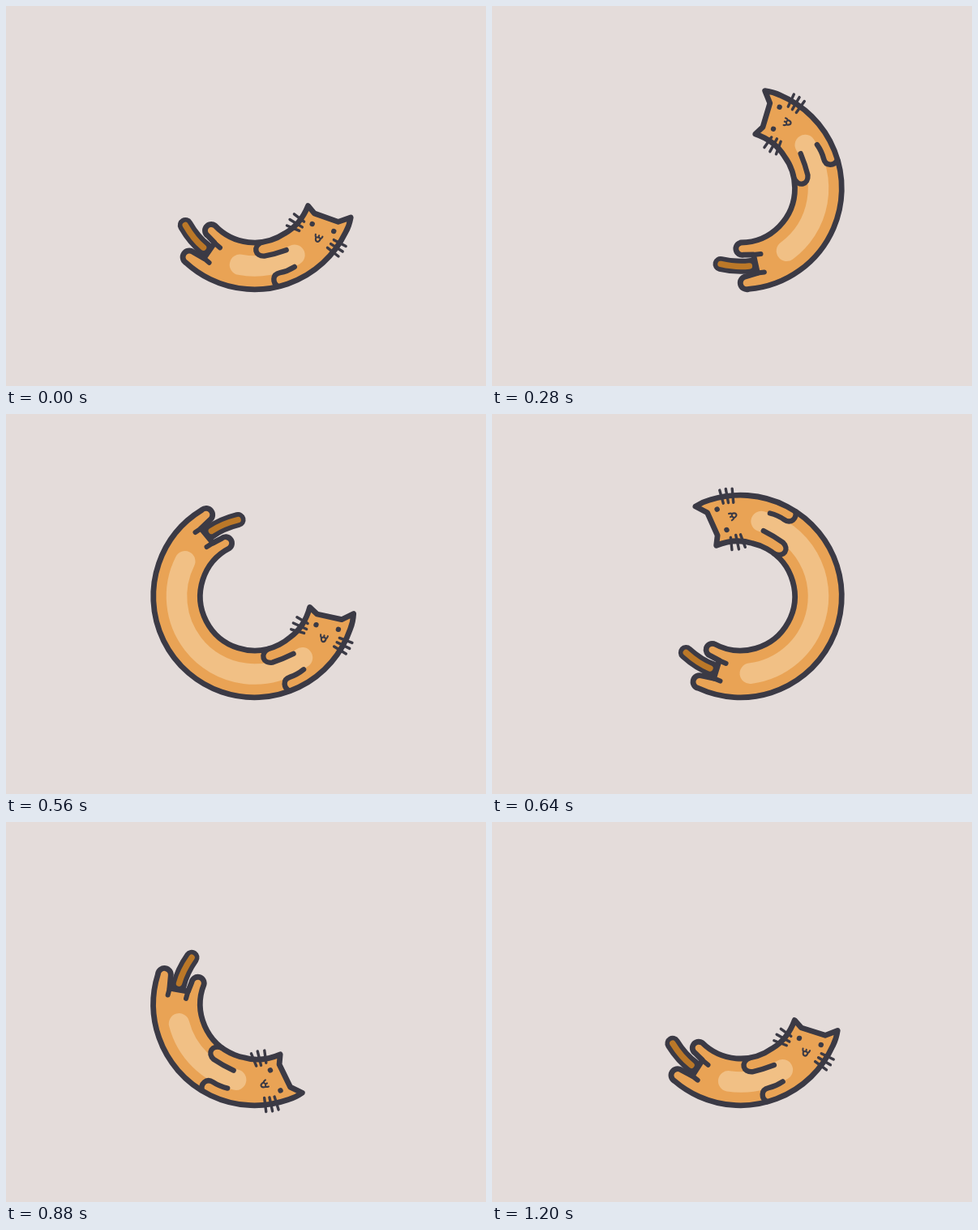
These frames come from a looping animation (592x469 px, 1.24 s). An HTML page with a canvas:

```html
<!DOCTYPE html>
<html lang="en">
<head>
<meta charset="utf-8">
<title>Cat chasing round a ring</title>
<style>
html, body { margin: 0; width: 100%; height: 100%; overflow: hidden; background: #e4dcda; }
canvas { display: block; }
</style>
</head>
<body>
<canvas id="stage" width="592" height="469"></canvas>
<script>
const ctx = document.getElementById('stage').getContext('2d');
const LOOP = 1240, STEP = 40;
const INNER = 67, OUTER = 124.8, BELLY = 96;
const DARK = '#3b3a45', FUR = '#e9a355', LIGHT = '#f1c085', TAIL = '#bb7828';
const rad = deg => deg * Math.PI / 180;

// Keys: time in ms, ring angle in degrees, speed in degrees per ms.
const headKeys = [[0, -30, .08], [280, 62.8, .55], [440, 189.3, 1.02], [560, 336.9, 1.42],
  [720, 571.3, .95], [880, 645.2, .27], [1200, 691.7, .03]];
const tailKeys = [[0, -124.8, .03], [280, -77.6, .42], [440, 27.2, .72], [560, 129.3, 1.1],
  [720, 384.8, 1.3], [880, 530.4, .5], [1200, 597.1, .02]];

// Cubic Hermite interpolation between keys.
function angleAt(keys, t) {
  let i = 0;
  while (i < keys.length - 2 && t >= keys[i + 1][0]) i++;
  const [t0, a, va] = keys[i], [t1, b, vb] = keys[i + 1];
  const d = t1 - t0, u = (t - t0) / d, w = 1 - u;
  return a * w * w * (1 + 2 * u) + b * u * u * (3 - 2 * u) + d * u * w * (va * w - vb * u);
}

// Origin at the ring centre; x points outwards at the given angle, -y points ahead.
function frame(deg) {
  ctx.setTransform(1, 0, 0, 1, 306.5, 225);
  ctx.rotate(-rad(deg));
}

function stroke(path, width, color = DARK) {
  ctx.lineWidth = width;
  ctx.strokeStyle = color;
  ctx.stroke(new Path2D(path));
}

function drawTail(angle) {
  frame(angle);
  stroke('M96 7Q95 25 86 44', 19);
  stroke('M96 10Q94.5 26 86 44', 7.5, TAIL);
}

function drawBody(head, tail) {
  ctx.beginPath();
  frame(head);
  ctx.moveTo(53, 41);
  ctx.quadraticCurveTo(68, 25, 69.5, -.5);
  ctx.lineTo(80, 6);
  ctx.lineTo(111, 6.5);
  ctx.lineTo(124, -3.5);
  ctx.quadraticCurveTo(125.5, 7, 123.8, 16);
  frame(0);
  ctx.arc(0, 0, OUTER, rad(7.4 - head), rad(7.9 - tail));
  frame(tail);
  ctx.arc(115.7, 17.5, 8, 0, Math.PI);
  ctx.lineTo(106.5, 2);
  ctx.lineTo(83.5, 2);
  ctx.lineTo(81, 14);
  ctx.arc(73.3, 14, 7.7, 0, Math.PI);
  frame(0);
  ctx.arc(0, 0, INNER, rad(12 - tail), rad(37.7 - head), true);
  ctx.closePath();
  ctx.fillStyle = FUR;
  ctx.fill();
  ctx.lineWidth = 6.8;
  ctx.strokeStyle = DARK;
  ctx.stroke();

  ctx.beginPath();
  ctx.arc(0, 0, BELLY, rad(40.5 - head), rad(-24 - tail));
  ctx.lineWidth = 25.5;
  ctx.strokeStyle = LIGHT;
  ctx.stroke();

  frame(tail);
  stroke('M106.5 2L107.3-6.5M83.5 2L84.5-7', 6);
}

function drawHead(angle) {
  frame(angle);
  stroke('M61.3 59.8Q49.3 69.2 38 75.5C27.5 79.5 20 69 30 60', 6.4);
  stroke('M77.5 76.3Q71 84.3 63 88.8C54 94 58 104 66 105.5', 6.4);
  stroke('M56.5 14.7L71 19.7M53.5 22.7L71 26.7M52.5 30.9L69 32.2', 3.4);
  stroke('M113 29.3L129.5 32M111 35.2L127.8 39.5M108.6 41L124.8 46.8', 3.4);
  stroke('M89.5 30Q90 35 94 32Q98 35 98.5 30M94 30V32M91 33.5Q91.5 38 94 38Q96.5 38 97 33.5', 2.1);
  ctx.fillStyle = DARK;
  for (const x of [81.5, 109.5]) {
    ctx.beginPath();
    ctx.arc(x, 19.2, 3.2, 0, 7);
    ctx.fill();
  }
}

function draw(now) {
  const t = Math.floor(now % LOOP / STEP) * STEP;
  const head = angleAt(headKeys, t) + 11.5, tail = angleAt(tailKeys, t);
  ctx.resetTransform();
  ctx.fillStyle = '#e4dcda';
  ctx.fillRect(0, 0, 592, 469);
  ctx.lineCap = ctx.lineJoin = 'round';
  drawTail(tail);
  drawBody(head, tail);
  drawHead(head);
  requestAnimationFrame(draw);
}
requestAnimationFrame(draw);
</script>
</body>
</html>
```
